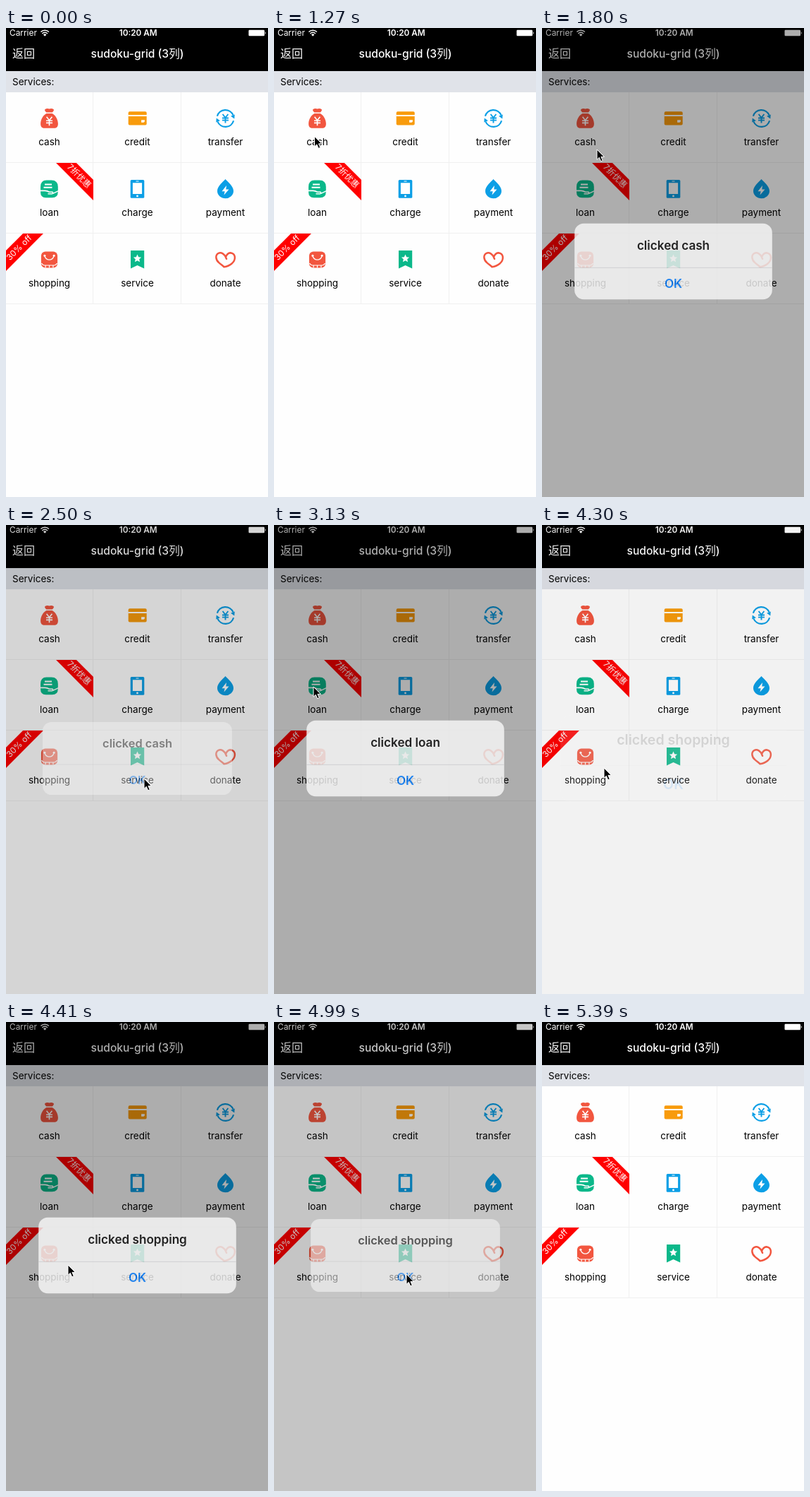
An HTML page for the animation above (5570 ms loop, 372x664 px).

```html
<!DOCTYPE html>
<html lang="zh-CN">
<head>
<meta charset="utf-8">
<title>sudoku-grid</title>
<style>
  html, body { margin: 0; width: 100%; height: 100%; overflow: hidden; background: #fefefe; }
  svg { display: block; }
  text { font: 13.5px Inter, "Noto Sans CJK SC", "Noto Sans CJK", sans-serif; }
  .mid { text-anchor: middle; }
  .bar text { fill: #fff; }
  .ribbon rect { fill: red; }
  .ribbon text { fill: #fff; font-size: 11.8px; }
  .red { fill: #f2563f; } .orange { fill: #f89b0c; } .blue { fill: #0c9fe6; } .green { fill: #0bb88a; }
  .w { fill: #fff; }
  .line { fill: none; stroke: #fff; stroke-width: 1.6; }
  .line.blue { stroke: #0c9fe6; stroke-width: 1.9; }
  .line.red { stroke: #f2563f; stroke-width: 2.5; stroke-linecap: round; }
  #alert text { font-size: 16.4px; font-weight: 600; }
</style>
</head>
<body>
<svg width="372" height="664" viewBox="0 0 372 664">
  <defs>
    <clipPath id="loanCell"><path d="M0 191H124V290H0z"/></clipPath>
    <clipPath id="shopCell"><path d="M0 291H124V390H0z"/></clipPath>
    <path id="yen" d="M-3.9 -6L0 -1L3.9 -6M0 -1V6.4M-4.5 -.5H4.5M-4.5 2.6H4.5"/>
    <g id="turn">
      <path class="line blue" style="stroke-width:2.2" d="M-11.6 -3.2A12 12 0 0 1 11 -4.6"/>
      <path class="blue" d="M7.6 -3.2L13.2 -5.4L12.8 .6z"/>
    </g>
  </defs>

  <rect width="372" height="664" fill="#fefefe"/>
  <g class="bar">
    <rect width="372" height="61"/>
    <text x="5" y="11.3" style="font-size:11.9px">Carrier</text>
    <g class="line" style="stroke-width:1.5">
      <path d="M49.4 5.6A8 8 0 0 1 60.9 5.6M51.4 7.9A5.2 5.2 0 0 1 58.9 7.9"/>
      <path class="w" stroke="none" d="M53 9.4A3 3 0 0 1 57.3 9.4L55.15 11.8z"/>
    </g>
    <text class="mid" x="187.7" y="11.3" style="font-size:11.8px;font-weight:600">10:20 AM</text>
    <rect class="w" x="344.5" y="2.8" width="22.5" height="8.4" rx="1.2"/>
    <path class="w" d="M367.8 5.2Q370 7 367.8 8.8z"/>
    <text x="9" y="41.5" style="font-size:16px">返回</text>
    <text class="mid" x="186.5" y="41.5" style="font-size:15.6px;font-weight:500">sudoku-grid (3列)</text>
  </g>
  <rect y="61" width="372" height="30" fill="#e0e3e9"/>
  <text x="9" y="81">Services:</text>
  <path d="M123.5 91V390M248.5 91V390M0 190.5H372M0 290.5H372M0 390.5H372" stroke="#f0f0f0"/>

  <g id="cells"></g>

  <g class="ribbon" clip-path="url(#loanCell)">
    <g transform="translate(104 209.5) rotate(45)">
      <rect x="-60" y="-10.2" width="120" height="20.4"/><text class="mid" y="4.2">7折优惠</text>
    </g>
  </g>
  <g class="ribbon" clip-path="url(#shopCell)">
    <g transform="translate(18.5 311) rotate(-45)">
      <rect x="-60" y="-10.2" width="120" height="20.4"/><text class="mid" y="4">30% off</text>
    </g>
  </g>

  <rect id="dim" width="372" height="664"/>
  <g id="alert">
    <rect x="-134.4" y="-51.6" width="268.8" height="103.2" rx="12.5" fill="#f9f9f9"/>
    <path d="M-134.4 8.5H134.4" stroke="#d3d3d6" stroke-width=".8"/>
    <text id="title" class="mid" y="-16"></text>
    <text class="mid" y="36.2" fill="#007aff">OK</text>
  </g>
  <path id="cursor" d="M0 0V14.4L3.3 11.3L5.7 16.8L8.2 15.7L5.9 10.4H10.4z" stroke="#fff"/>
</svg>

<script>
const $ = id => document.getElementById(id);

const star = Array.from({length: 10}, (_, i) => {
  const r = i % 2 ? 2.8 : 6, a = (i / 5 - .5) * Math.PI;
  return [r * Math.cos(a), r * Math.sin(a) - 1.5];
}).join(' ');

// icons are drawn around their own centre
const icons = {
  cash: `<path class="red" d="M-6 -13Q-3 -14.6 0 -13.4Q3 -14.6 6 -13Q7.2 -12 5.6 -10L4.2 -8.6H-4.2L-5.6 -10Q-7.2 -12 -6 -13z
      M-4 -7H4C8.4 -5 12.4 1.4 12.4 7.4C12.4 12 10 13.8 7 13.8H-7C-10 13.8 -12.4 12 -12.4 7.4C-12.4 1.4 -8.4 -5 -4 -7z"/>
    <use href="#yen" y="3.8" class="line"/>`,
  credit: `<rect class="orange" x="-12.8" y="-9.8" width="26" height="19.4" rx="2"/>
    <path class="w" d="M-13 -5H13.4V-3H-13zM5.6 2.2H10.4V4.6L9 5.8H5.6z"/>`,
  transfer: `<use href="#turn"/><use href="#turn" transform="rotate(180)"/><use href="#yen" class="line blue"/>`,
  loan: `<path class="green" d="M-4 -12.5H3Q12.3 -12.5 12.3 -3V4Q12.3 12.3 4 12.3H-5Q-12.5 12.3 -12.5 4V-3Q-12.5 -12.5 -4 -12.5z"/>
    <path class="line" d="M-6.5 -6.6H3.5M-8 -2.2H4" style="stroke-width:2"/>
    <path class="line" d="M-13 2.4H-6Q-3 2.4 0 4.2H4.6Q6.2 6 3.6 6.8H-2M5 6.4L13 2.6"/>`,
  charge: `<rect class="blue" x="-9.8" y="-13" width="19.6" height="25.8" rx="1.6"/>
    <path class="w" d="M-6.6 -8.8H6.6V7H-6.6zM-2 -11.4H2V-10.6H-2z"/><circle class="w" cy="9.9" r="1.4"/>`,
  payment: `<path class="blue" d="M0 -14C4 -9.5 11.5 -4 11.5 2.8A11.5 10.4 0 0 1 -11.5 2.8C-11.5 -4 -4 -9.5 0 -14z"/>
    <path class="w" d="M1.5 -5L-5 3.2H-.8L-2 8.6L5 .4H.8z"/>`,
  shopping: `<rect class="red" x="-11.6" y="-11.6" width="23.2" height="23.2" rx="6"/>
    <circle class="w" cx="-6.6" cy="-5.8" r="1.5"/><circle class="w" cx="6.6" cy="-5.8" r="1.5"/>
    <path class="line" d="M-6.6 -5Q-4.6 .2 0 .2Q4.6 .2 6.6 -5" style="stroke-width:1.3"/>
    <path class="line" d="M-11 5Q-9.4 8 -6.5 8H6.5Q9.4 8 11 5M-5.4 8V11.6M0 8V11.6M5.4 8V11.6" style="stroke-width:1.2"/>`,
  service: `<path class="green" d="M-9.5 -13H9.7V12.4L0 8L-9.5 12.4z"/><polygon class="w" points="${star}"/>`,
  donate: `<path class="line red" d="M1 -2.4C-1 -8 -6 -11 -9.8 -9.2C-14.6 -6.8 -14.2 0 -9 4.4C-6 7 -4 8.4 -2 10.2
      C6 9.4 13.8 3.6 13.4 -3.4C13 -9.4 6.5 -11.2 3.2 -8C.6 -5.4 .2 -2.6 1.6 -1.2"/>`
};

$('cells').innerHTML = Object.entries(icons).map(([name, art], i) => {
  const x = 61.5 + i % 3 * 125, y = 128 + Math.floor(i / 3) * 100;
  return `<g transform="translate(${x} ${y})">${art}<text class="mid" y="38">${name}</text></g>`;
}).join('');

const LOOP = 5570;
const spans = [[900, 1330], [1680, 2210], [2270, 2780], [3020, 3480], [3660, 4060], [4300, 4750], [4870, 5390]];
const alerts = [[1650, 2409, 'cash'], [2990, 3696, 'loan'], [4270, 4915, 'shopping']];
// time, x, y of the pointer tip
const path = [
  [900, 280, 636], [1150, 17, 117], [1330, 78, 172], [1800, 78, 172], [2210, 196, 359],
  [2510, 196, 359], [2780, 56, 229], [3140, 56, 229], [3480, 185, 355], [3780, 185, 355],
  [4060, 88, 344], [4420, 88, 344], [4750, 188, 357], [5050, 188, 357], [5390, 280, 640]
];

function sample(t) {
  let s = 0;
  for (const [a, b] of spans)
    if (t >= a) s = t >= b ? b : Math.min(b, a + Math.floor((t - a + 10) / 60) * 60);
  return s;
}

// what is left of a critically damped spring after ms
function rest(ms) {
  const x = Math.max(0, ms) / 50, r = (1 + x) * Math.exp(-x);
  return r < .01 ? 0 : r;
}

function pointer(t) {
  const i = path.findIndex(p => p[0] > t);
  const [a, ax, ay] = path[i - 1], [b, bx, by] = path[i];
  const u = (t - a) / (b - a), e = u * u * (3 - 2 * u);
  return [ax + (bx - ax) * e, ay + (by - ay) * e];
}

function draw(now) {
  const t = sample(now % LOOP);
  const [open, close, name] = alerts.findLast(a => t >= a[0]) || [LOOP, LOOP, ''];
  const left = rest(t - open);
  const shown = t < open ? 0 : t < close ? 1 - left : rest(t - close);
  $('dim').setAttribute('opacity', .4 * shown);
  $('alert').setAttribute('opacity', shown);
  $('alert').setAttribute('transform', `translate(186.5 330.5) scale(${1 + .22 * left})`);
  $('title').textContent = 'clicked ' + name;

  const visible = t >= 900 && t < 5390;
  $('cursor').style.display = visible ? '' : 'none';
  if (visible) $('cursor').setAttribute('transform', `translate(${pointer(t)})`);
}

const start = performance.now();
function tick() {
  draw(performance.now() - start);
  requestAnimationFrame(tick);
}
tick();
</script>
</body>
</html>
```
